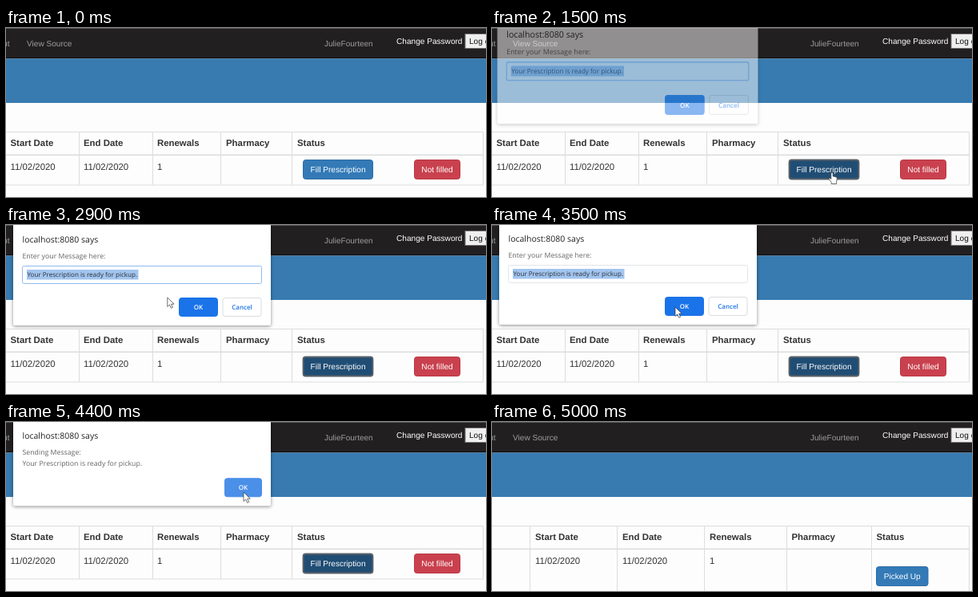
These frames come from a looping animation (600x212 px, 5.7 s). An HTML page:

```html
<!DOCTYPE html>
<html lang="en">
<head>
<meta charset="utf-8">
<title>Prescription pickup</title>
<style>
  html, body { margin: 0; width: 100%; height: 100%; overflow: hidden; background: #fdfdfe; }
  svg { display: block; text-rendering: geometricPrecision; font-family: "Liberation Sans", Arial, sans-serif; }
  .dialog { font-family: "Open Sans", "Noto Sans", sans-serif; }
  .frame { filter: drop-shadow(0 1px 2px rgba(0, 0, 0, .45)); }
</style>
</head>
<body>
<svg id="stage" width="600" height="212" viewBox="0 0 600 212"></svg>
<script>
const LOOP = 5700, STEP = 100;

const rect = (x, y, w, h, fill, extra = '') =>
  `<rect x="${x}" y="${y}" width="${w}" height="${h}" fill="${fill}" ${extra}/>`;
const text = (x, y, size, fill, label, extra = '') =>
  `<text x="${x}" y="${y}" font-size="${size}" fill="${fill}" ${extra}>${label}</text>`;
const button = (id, x, y, w, h, fill, border, label, color = '#fff', extra = '') =>
  rect(x + .5, y + .5, w - 1, h - 1, fill, `id="${id}" rx="3" stroke="${border}"`) +
  text(x + w / 2, y + h / 2 + (extra ? 3 : 3.5), extra ? 8 : 10.1, color, label, `text-anchor="middle" ${extra}`);

const BLUE = '#337ab7', LINE = '#ddd', INK = '#333';

function table(id, columns, dividers, bottom) {
  const values = ['11/02/2020', '11/02/2020', '1'];
  const heads = ['Start Date', 'End Date', 'Renewals', 'Pharmacy', 'Status'];
  return `<g id="${id}">` +
    rect(0, 130, 597, 1, LINE) + rect(0, 158.5, 597, 1.6, LINE) + rect(0, bottom, 597, 1, LINE) +
    dividers.map(x => rect(x, 130, 1, bottom - 130, LINE)).join('') +
    heads.map((h, i) => text(columns[i], 148, 11.4, INK, h, 'font-weight="700"')).join('') +
    values.map((v, i) => text(columns[i], 178, 11.4, INK, v)).join('');
}

const page =
  rect(0, 0, 600, 38, '#221f21') + rect(0, 0, 600, 1, '#555') + rect(0, 37, 600, 1.5, '#0c0c0c') +
  rect(0, 38.5, 600, 55.5, '#387bb0') +
  text(4.5, 22.8, 10.1, '#9d9d9d', 'About', 'text-anchor="end"') +
  text(26, 22.8, 10.1, '#9d9d9d', 'View Source') +
  text(398, 22.8, 10, '#9d9d9d', 'JulieFourteen') +
  text(488, 20, 10.1, '#fff', 'Change Password') +
  rect(574, 7.5, 50, 18, '#efefef', 'stroke="#777"') +
  text(579, 20, 10.1, '#111', 'Log out') +
  table('pending', [5.5, 97, 189, 275, 364], [91, 183, 268, 357, 596], 196.5) +
  button('fill', 371, 165, 88, 25, BLUE, '#2e6da4', 'Fill Prescription') +
  button('unfilled', 510, 165, 58, 25, '#c9414e', '#bd3744', 'Not filled') + '</g>' +
  table('done', [54, 163, 272, 374.5, 480.5], [47, 156, 265, 368, 474, 596], 214) +
  button('picked', 480, 181, 65.5, 25, BLUE, '#2e6da4', 'Picked Up') + '</g>';

const MESSAGE = 'Your Prescription is ready for pickup.';
const bold = 'font-weight="600"';
const dialog = (id, height, body) => `<g id="${id}" class="dialog">` +
  rect(9, -5, 322, height + 5, '#fff', 'class="frame" rx="2"') +
  text(20.5, 22, 10.5, '#202124', 'localhost:8080 says') + body + '</g>';

const dialogs =
  dialog('prompt', 126,
    text(20.5, 42, 8.75, '#666', 'Enter your Message here:') +
    rect(20.5, 51.5, 299, 22, '#fff', 'id="input" rx="2"') +
    rect(26, 56, 139.5, 12.5, '#a2c5f0') +
    text(26.5, 65.3, 8.05, '#2c2f33', MESSAGE) +
    button('send', 216, 91, 49, 24, '#1a73e8', '#1a73e8', 'OK', '#fff', bold) +
    button('cancel', 270.5, 91, 49, 24, '#fff', '#dadce0', 'Cancel', '#1a73e8', bold)) +
  dialog('notice', 106,
    text(20.5, 41.5, 8.75, '#666', 'Sending Message:') +
    text(20.5, 55.5, 8.75, '#666', MESSAGE) +
    button('confirm', 273, 71, 47, 24, '#1a73e8', '#1a73e8', 'OK', '#fff', bold));

const outline = 'stroke="#333" stroke-width=".7" stroke-linejoin="round"';
const pointers = `<g id="pointer">
  <path id="arrow" fill="#fff" ${outline} d="M0 0V11.5L2.7 9L4.6 13.3L6.6 12.4L4.7 8.2H8.3Z"/>
  <path id="hand" fill="#fff" ${outline} d="M-1.2 1Q0 -.6 1.2 1V5L5 5.8Q6.4 6.2 6.3 7.6L5.6 12V14.5H-.8V12.6L-3.8 8.6Q-4 6.8 -2.4 7.4L-1.2 8.6Z"/>
  <path id="beam" fill="none" stroke="#111" d="M-2.5 -6.5H2.5M0 -6.5V6.5M-2.5 6.5H2.5"/></g>`;

document.getElementById('stage').innerHTML = page + dialogs + pointers;

const $ = id => document.getElementById(id);
const set = (id, attrs) => { for (const k in attrs) $(id).setAttribute(k, attrs[k]); };
const show = (id, on) => set(id, { visibility: on ? 'visible' : 'hidden' });
const ramp = (t, from, to) => Math.min(1, Math.max(0, (t - from) / (to - from)));

// Pointer route: time, x, y
const route = [
  [0, 438, 214], [200, 438, 214], [800, 425, 181], [2000, 425, 181], [2300, 294, 132],
  [2600, 161, 73], [3100, 229, 103], [3900, 229, 103], [4300, 297, 88], [4400, 297, 88],
  [5000, 530, 216], [LOOP, 530, 216]
];
function pointerAt(t) {
  const i = route.findIndex(p => p[0] > t);
  const [t0, x0, y0] = route[i - 1], [t1, x1, y1] = route[i];
  const p = ramp(t, t0, t1);
  return [x0 + (x1 - x0) * p, y0 + (y1 - y0) * p];
}

// Windows open slightly enlarged and shifted up, then settle; they drift up and fade to close.
function animateDialog(id, t, open, opened, close, closed) {
  const p = ramp(t, open, opened), k = 2 * (1 - p);
  const lift = 10.7 * k + 3 * ramp(t, close - STEP, closed);
  set(id, {
    opacity: p * (1 - ramp(t, close, closed)),
    transform: `translate(${-2.5 * k} ${-lift}) scale(${1 + .012 * k} ${1 + .04 * k})`
  });
}

function render(now) {
  const t = Math.floor(now % LOOP / STEP) * STEP;
  const [x, y] = pointerAt(t);
  const inside = (l, top, r, b) => x >= l && x <= r && y >= top && y <= b;
  const done = t >= 4500, pressed = t >= 1300;
  show('pending', !done);
  show('done', done);

  const overFill = !done && inside(371, 165, 459, 190);
  const overPicked = done && inside(480, 181, 545, 206);
  set('fill', {
    fill: pressed ? '#204d74' : overFill ? '#2b628f' : BLUE,
    stroke: pressed ? '#5c6268' : overFill ? '#204d74' : '#2e6da4',
    'stroke-width': pressed ? 1.8 : 1
  });
  set('picked', { fill: overPicked ? '#2b628f' : BLUE });

  animateDialog('prompt', t, 1300, 1700, 3500, 3700);
  animateDialog('notice', t, 3500, 3700, 4400, 4700);
  set('input', { stroke: t < 3300 ? '#8fbaf0' : '#e2e4e8' });
  const hot = t >= 4300 ? '#4a8fe8' : '#1a73e8';
  set('confirm', { fill: hot, stroke: hot });

  const hand = overFill || overPicked;
  const beam = t > 1700 && t < 3500 && inside(20, 51, 320, 74);
  show('hand', hand);
  show('beam', beam);
  show('arrow', !hand && !beam);
  set('pointer', { transform: `translate(${x} ${y})` });
}

let start;
function tick(now) {
  start ??= now;
  render(now - start);
  requestAnimationFrame(tick);
}
render(0);
requestAnimationFrame(tick);
</script>
</body>
</html>
```
